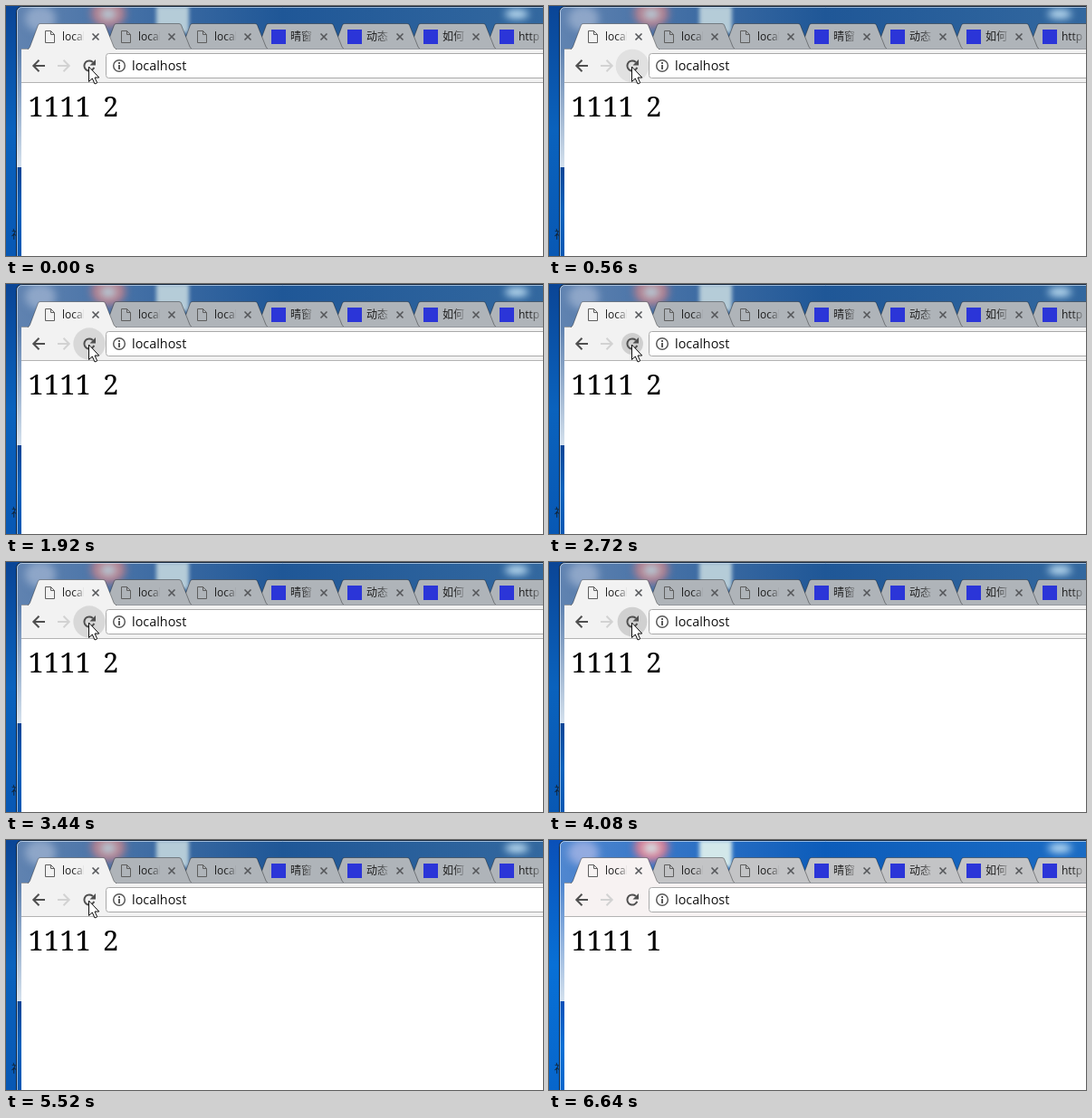
Recreate the animation shown at these times as an HTML page with a canvas. Size 593 by 276 pixels, loop 9.44 s.

```html
<!DOCTYPE html>
<html lang="zh">
<head>
<meta charset="utf-8">
<style>
  html, body { margin: 0; width: 100%; height: 100%; overflow: hidden; }
  canvas { display: block; }
</style>
</head>
<body>
<canvas id="stage" width="593" height="276"></canvas>
<script>
const ctx = document.getElementById('stage').getContext('2d');
const LOOP = 9440, STEP = 80, IDLE_FROM = 6640;
const CLICKS = [160, 640, 1200, 1600, 2160, 2640, 3120, 3520, 3920, 4400];
const UI = '"Open Sans", "Noto Sans CJK SC", "Noto Sans CJK", sans-serif';
const TABS = ['local', 'local', 'local', '晴窗', '动态', '如何', 'http:'];

const DIM = {
  desk: ['#0a4596', '#0a62bd', '#0858b4'], glass: ['#5f82b0', '#1f5797', '#33689f'],
  haze: '#8ea6c8', pink: '#b4808f', pale: '#b5ccd8', tab: '#afb4b9', bar: '#f2f2f2'
};
const BRIGHT = {
  desk: ['#0a50b8', '#0870d6', '#0766cc'], glass: ['#4f86cf', '#0c5cba', '#1b6cc4'],
  haze: '#93abe0', pink: '#d97c93', pale: '#d3e8ea', tab: '#c3c4c6', bar: '#f7f2f2'
};

function gradient(x0, y0, x1, y1, colors) {
  const g = ctx.createLinearGradient(x0, y0, x1, y1);
  colors.forEach((c, i) => g.addColorStop(i / (colors.length - 1), c));
  return g;
}

function rect(x, y, w, h, fill) {
  ctx.fillStyle = fill;
  ctx.fillRect(x, y, w, h);
}

function oval(x, y, rx, ry, fill) {
  ctx.fillStyle = fill;
  ctx.beginPath();
  ctx.ellipse(x, y, rx, ry, 0, 0, 7);
  ctx.fill();
}

function stroke(path, color, width = 1) {
  ctx.strokeStyle = color;
  ctx.lineWidth = width;
  ctx.stroke(new Path2D(path));
}

function text(string, x, y, font, fill) {
  ctx.font = font;
  ctx.fillStyle = fill;
  ctx.fillText(string, x, y);
}

function frame(inset, color) {
  ctx.strokeStyle = color;
  ctx.lineWidth = 1;
  ctx.beginPath();
  ctx.roundRect(11.5 + inset, 0.5 + inset, 620, 300, 6 - inset);
  ctx.stroke();
}

function drawDesktop(theme) {
  rect(0, 0, 593, 276, gradient(0, 0, 0, 276, theme.desk));
  text('福', 6, 257, `12px ${UI}`, '#10202f');

  // Window glass with the blurred wallpaper showing through
  ctx.save();
  ctx.beginPath();
  ctx.roundRect(11.5, 0.5, 620, 300, 6);
  ctx.clip();
  rect(11, 0, 582, 276, gradient(17, 0, 593, 0, theme.glass));
  rect(11, 48, 7, 130, gradient(0, 48, 0, 178, [theme.glass[0], '#d5e1ed']));
  rect(11, 178, 7, 98, gradient(0, 178, 0, 276, theme.desk));
  ctx.filter = 'blur(4px)';
  oval(38, 14, 17, 14, theme.haze);
  oval(113, 8, 19, 16, theme.pink);
  oval(113, 9, 9, 6, theme.pale);
  oval(564, 9, 13, 5, '#c3e2f5');
  ctx.filter = 'blur(2px)';
  rect(166, 0, 36, 30, theme.pale);
  ctx.restore();
  frame(0, '#13263d');
  frame(1, 'rgba(220,235,250,.65)');
}

function drawTab(index, theme) {
  const x = 24 + 84 * index;
  const active = index === 0;
  const shape = new Path2D(`M${x} 48 Q${x + 1.5} 47 ${x + 2.5} 45 L${x + 11.5} 21
    Q${x + 12} 19.5 ${x + 14} 19.5 H${x + 83} Q${x + 85} 19.5 ${x + 85.5} 21
    L${x + 95} 45 Q${x + 96} 47 ${x + 98} 48 Z`);
  ctx.fillStyle = active ? theme.bar : theme.tab;
  ctx.fill(shape);
  ctx.strokeStyle = 'rgba(0,0,0,.36)';
  ctx.lineWidth = 1;
  ctx.stroke(shape);
  if (active) rect(x + 1, 47, 96, 2, theme.bar);

  if (index < 3) {
    stroke(`M${x + 19.5} 27.5 h6 l4 4 v9 h-10 Z M${x + 25.5} 27.5 v4 h4`, '#5e5e5e');
  } else {
    rect(x + 17, 26, 16, 16, '#2b35d8');
  }
  ctx.save();
  ctx.beginPath();
  ctx.rect(x + 37, 22, 25, 24);
  ctx.clip();
  text(TABS[index], x + 38, 38, `12px ${UI}`,
    gradient(x + 50, 0, x + 64, 0, ['#1c1c1c', 'rgba(28,28,28,.1)']));
  ctx.restore();
  stroke(`M${x + 71.5} 30.5 l7 7 m0 -7 l-7 7`, '#55575a', 1.6);
}

function drawRipple(t) {
  const start = CLICKS.findLast(c => c <= t);
  const age = t - start;
  if (!(age < 560)) return;
  const grow = Math.min(age / 240, 1);
  const fade = Math.max(age - 240, 0);
  const radius = 17 * (1 - (1 - grow) ** 3) + fade / 120;
  oval(92, 66, radius, radius, `rgba(0,0,0,${0.14 * (1 - fade / 320)})`);
}

function drawToolbar(theme, t) {
  rect(17, 48, 576, 36, theme.bar);
  rect(17, 84, 576, 1, '#b3b3b3');
  if (t < IDLE_FROM) drawRipple(t);

  stroke('M43 66 H30.5 M36.5 59.8 L30.3 66 L36.5 72.2', '#4f4f4f', 2);
  stroke('M57 66 H69.5 M63.5 59.8 L69.7 66 L63.5 72.2', '#d2d2d2', 2);

  ctx.strokeStyle = ctx.fillStyle = '#4f4f4f';
  ctx.lineWidth = 2;
  ctx.beginPath();
  ctx.arc(92, 66, 5.6, 0.35, 5.5);
  ctx.stroke();
  ctx.fill(new Path2D('M99 59 V65.5 H92.5 Z'));

  ctx.fillStyle = '#fff';
  ctx.strokeStyle = '#a9a9a9';
  ctx.lineWidth = 1;
  ctx.beginPath();
  ctx.roundRect(110.5, 52.5, 520, 27, 3);
  ctx.fill();
  ctx.stroke();

  ctx.strokeStyle = '#5a5a5a';
  ctx.lineWidth = 1.5;
  ctx.beginPath();
  ctx.arc(125, 66, 6.3, 0, 7);
  ctx.stroke();
  rect(124, 62, 2, 2, '#5a5a5a');
  rect(124, 65, 2, 5, '#5a5a5a');
  text('localhost', 139, 71, `14.4px ${UI}`, '#111');
}

function drawPage(server) {
  rect(17, 85, 576, 191, '#fff');
  ctx.wordSpacing = '5px';
  text(`1111 ${server}`, 24.5, 122, '31px "Noto Serif", serif', '#000');
  ctx.wordSpacing = '0px';
}

function drawCursor() {
  const arrow = new Path2D('M91.5 67 V83.5 L95.3 80 L98 86 L100.7 84.8 L98 79 H102.8 Z');
  ctx.fillStyle = '#fff';
  ctx.fill(arrow);
  ctx.strokeStyle = '#111';
  ctx.lineWidth = 1;
  ctx.stroke(arrow);
}

function draw(now) {
  const t = Math.floor((now % LOOP) / STEP) * STEP;
  const idle = t >= IDLE_FROM;
  const theme = idle ? BRIGHT : DIM;
  drawDesktop(theme);
  for (let i = TABS.length - 1; i > 0; i--) drawTab(i, theme);
  rect(17, 47, 576, 1, '#94989e');
  drawTab(0, theme);
  drawToolbar(theme, t);
  drawPage(idle ? 1 : 2);
  if (!idle) drawCursor();
}

const origin = performance.now();
function tick() {
  draw(performance.now() - origin);
  requestAnimationFrame(tick);
}
tick();
</script>
</body>
</html>
```
